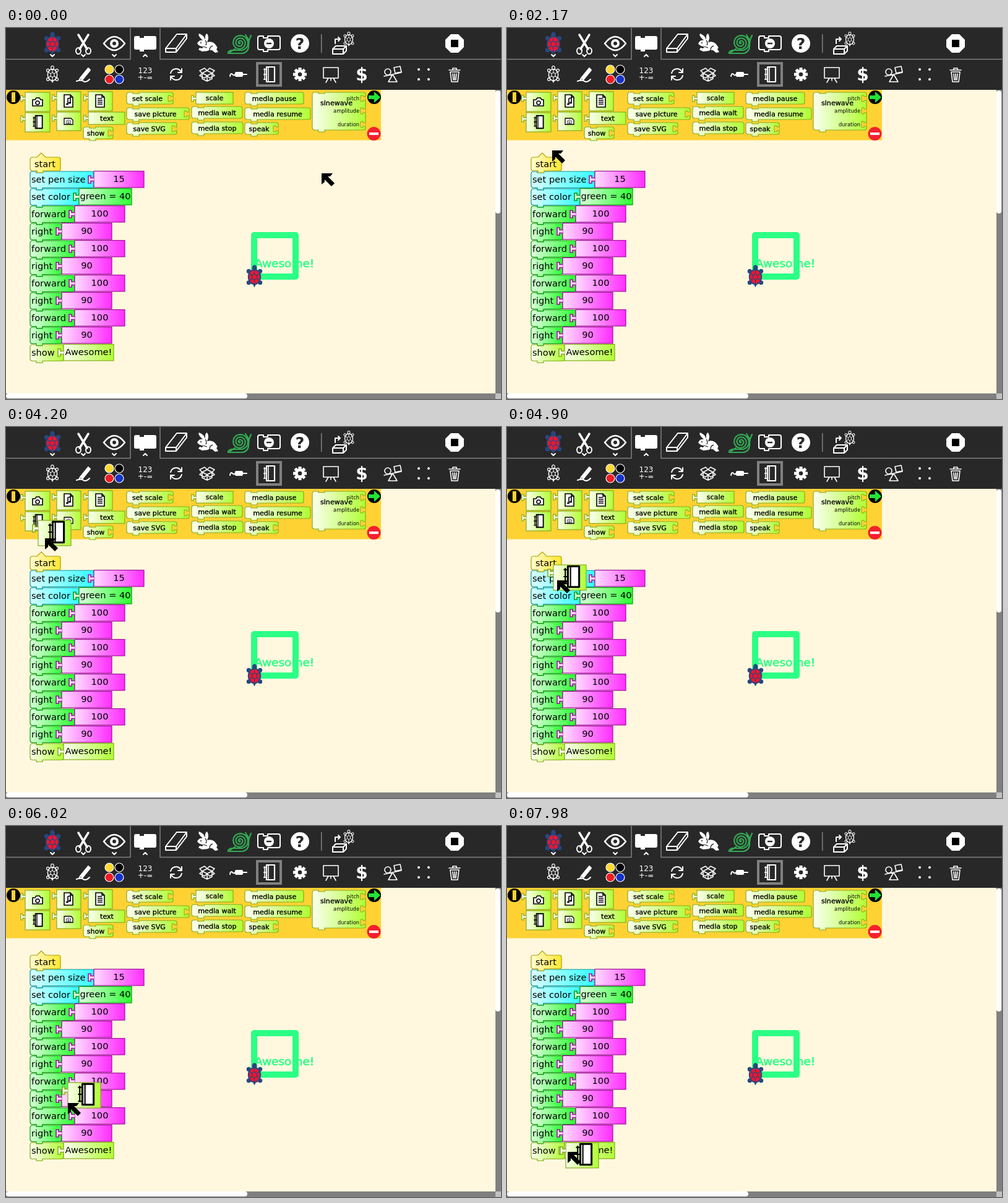
An HTML page that plays this animation: 800x600 px, repeating every 8 s.

```html
<!DOCTYPE html>
<html lang="en">
<head>
<meta charset="utf-8">
<title>Block programming</title>
<style>
  html, body { margin: 0; width: 100%; height: 100%; overflow: hidden; background: #fff8de; }
  svg { display: block; width: 800px; height: 600px; }
  text { font-family: "DejaVu Sans", sans-serif; }
  .line { fill: none; stroke: #fff; stroke-width: 2; stroke-linejoin: round; stroke-linecap: round; }
  .thin { stroke-width: 1.6; }
  .dark { fill: none; stroke: #000; stroke-width: 1.6; stroke-linejoin: round; }
</style>
</head>
<body>
<svg id="stage" viewBox="0 0 800 600"></svg>
<script>
const BAR = '#282828', GREY = '#808080', PEN = '#2bff85', YELLOW = '#ffd234', RED = '#f5142e', BLUE = '#27477e';
// light end, full end, outline
const hues = {
  lime: ['#fbfff0', '#b0ff33', '#86ac18'],
  cyan: ['#d8ffff', '#33ffff', '#0795a0'],
  green: ['#dcffdc', '#2dff33', '#079b0c'],
  magenta: ['#ffdcff', '#ff2dff', '#a0109c'],
  yellow: ['#fffbd0', '#ffe72e', '#b0a000'],
};

const at = (x, y, body, scale = 1) => `<g transform="translate(${x} ${y}) scale(${scale})">${body}</g>`;
const path = (d, attrs = 'class="line"') => `<path d="${d}" ${attrs}/>`;
const box = (x, y, w, h, attrs) => `<rect x="${x}" y="${y}" width="${w}" height="${h}" ${attrs}/>`;
const rect = (x, y, w, h, fill, extra = '') => box(x, y, w, h, `fill="${fill}" ${extra}`);
const oval = (x, y, rx, ry, attrs) => `<ellipse cx="${x}" cy="${y}" rx="${rx}" ry="${ry}" ${attrs}/>`;
const disc = (x, y, r, fill, extra = '') => oval(x, y, r, r, `fill="${fill}" ${extra}`);
const label = (x, y, size, words, extra = '') =>
  `<text x="${x}" y="${y}" font-size="${size}" ${extra}>${words}</text>`;
const paint = hue => `fill="url(#${hue})" stroke="${hues[hue][2]}" stroke-width="1.2"`;
const thin = 'class="line thin"', white = 'fill="#fff"';

const gradients = Object.entries(hues).map(([id, [light, full]]) =>
  `<linearGradient id="${id}"><stop stop-color="${light}"/><stop offset="1" stop-color="${full}"/></linearGradient>`).join('');

function turtle(x, y, shell, edge, scale = 1) {
  const limb = `fill="${shell === 'none' ? 'none' : edge}" stroke="${edge}" stroke-width="1.4"`;
  const feet = [[-8.5, -7.5], [8.5, -7.5], [-8.5, 9.5], [8.5, 9.5]].map(([a, b]) => oval(a, b, 2.6, 2.6, limb)).join('');
  const ring = Array.from({ length: 6 }, (_, i) => [Math.sin(i * Math.PI / 3), -Math.cos(i * Math.PI / 3)]);
  const spokes = ring.map(([c, s]) => `M${4 * c} ${1 + 4.5 * s}L${9 * c} ${1 + 11 * s}`).join('');
  const core = 'M' + ring.map(([c, s]) => `${4 * c} ${1 + 4.5 * s}`).join('L') + 'Z';
  return at(x, y, feet + oval(0, -12.5, 2.8, 3.6, limb) + path('M-1.5 12L0 15L1.5 12Z', limb) +
    oval(0, 1, 9, 11, `fill="${shell}" stroke="${edge}" stroke-width="1.8"`) +
    path(core + spokes, `fill="none" stroke="${edge}" stroke-width="1.2"`), scale);
}

const plug = (x, y, hue, size = 1) =>
  at(x, y, path('M0-2.5H-5V-6H-9V6H-5V2.5H0', `fill="${hues[hue][0]}" stroke="${hues[hue][2]}" stroke-width="1.6"`), size);
const socket = (x, y) => path(`M${x} ${y}h-4v-2h-4v10h4v-2h4`, `fill="${YELLOW}" stroke="#86ac18"`);

function command(x, y, w, h, hue) {
  return path(`M${x} ${y + 4}q0-4 4-4h6v2h10v-2H${x + w - 3}q3 0 3 3V${y + h - 3}q0 3-3 3H${x + 20}v3h-10v-3h-6q-4 0-4-4Z`, paint(hue));
}

function value(x, y, w, h, hue, words) {
  return box(x, y - .5, w, h, paint(hue)) + plug(x, y + 13, hue) +
    label(x + w / 2, y + 16.5, 14.6, words, 'text-anchor="middle"');
}

// Page with a ring binding, drawn around its centre
function notebook(edge, page) {
  return path('M-4-12H9V12H-4Z', `fill="${page}" stroke="${edge}" stroke-width="2.2" stroke-linejoin="round"`) +
    path('M-1-12V12M-9-8h6M-9 0h6M-9 8h6M-7-10V9', `fill="none" stroke="${edge}" stroke-width="1.5"`);
}

function spiral(turns, radius) {
  const steps = turns * 24;
  return 'M' + Array.from({ length: steps + 1 }, (_, i) => {
    const angle = i * Math.PI / 12, r = radius * i / steps;
    return `${(r * Math.cos(angle)).toFixed(1)} ${(r * Math.sin(angle)).toFixed(1)}`;
  }).join('L');
}

function toolbar() {
  const caret = (x, flip) => path(`M${x - 3} ${flip ? 46 : 43}l3 ${flip ? -3 : 3}l3 ${flip ? 3 : -3}`);
  const block = 'M-18-9q0-3 3-3h6v3h7v-3H15q3 0 3 3V7q0 3-3 3H-2v3h-7v-3h-6q-3 0-3-3Z';
  const top = [
    turtle(75, 25, RED, BLUE, 1.12),
    at(125, 25, path('M-8-14L6 9M8-14L-6 9', 'class="line" style="stroke-width:3.5"') +
      oval(-8, 12, 4, 5, 'class="line"') + oval(8, 12, 4, 5, 'class="line"')),
    at(175, 25, path('M-17 0Q0-22 17 0Q0 22-17 0Z', 'class="line" style="stroke-width:2.5"') +
      disc(0, 0, 7, '#fff') + disc(0, 0, 3, BAR)),
    at(225, 25, path(block, white)),
    at(275, 25, path('M-17 8L1-15H17L0 8ZM-17 8V14H0V8M0 14L17-8V-15')),
    at(325, 25, path('M-16 0Q-13-6-7-5Q-16-13-13-16Q-6-14-3-6Q-4-15 0-16Q4-10 0-2Q10-5 15 4Q18 7 15 9L18 14L13 15L8 11Q3 10 1 12L-8 13L-14 10L-12 7L-8 8L-6 5Q-13 5-16 0Z', white) +
      path('M-3-5Q0-2-2 3M4 11Q4 5 9 4M-6 5L0 7', `fill="none" stroke="${BAR}" stroke-width="1.3"`) + disc(-10, -1, 1.1, BAR)),
    at(378, 24, path(spiral(3, 13) + 'M13 0Q13 9 4 12L-14 12Q-20 14-19 17H4Q15 15 14 2L15-5M14-5L9-13M15-5L18-12M-8 10L-16 15',
      'fill="none" stroke="#32a852" stroke-width="2.2" stroke-linecap="round"')),
    at(425, 25, path(block) + disc(0, 0, 8, '#fff') + rect(-4, -1.2, 8, 2.4, BAR)),
    disc(475, 25, 15, '#fff') + label(475, 34, 25, '?', `text-anchor="middle" font-weight="bold" fill="${BAR}"`),
    rect(509, 10, 1.5, 30, GREY),
    turtle(554, 18, 'none', '#fff', .72),
    path('M528 34L533 29H550L545 34ZM528 34V42H545V34M545 42L550 37V29M532 25V18H540M537 15L540 18L537 21'),
    path('M719 10H731L740 19V31L731 40H719L710 31V19Z', white) + rect(719, 19, 12, 12, '#000'),
    caret(75), caret(125), caret(175), caret(225, true),
  ];
  const gear = Array.from({ length: 8 }, (_, i) => rect(-2.5, -11, 5, 6, '#fff', `transform="rotate(${i * 45})"`)).join('');
  const swatch = (x, y, fill) => disc(x, y, 7, fill, 'stroke="#fff" stroke-width="1.2"');
  const bottom = [
    turtle(75, 75, 'none', '#fff', .85),
    at(125, 75, path('M-5 6L8-10L11-7L-2 9L-7 10ZM-11 11Q-4 8 0 11T10 8') + path('M-5 6L8-10L11-7L-2 9Z', white)),
    swatch(167, 67, '#ffd833') + swatch(183, 67, '#000') + swatch(167, 83, '#f01c24') + swatch(183, 83, '#1632c8'),
    label(225, 73, 12, '123', 'fill="#fff" text-anchor="middle"') + label(225, 84, 12, '+-=', 'fill="#fff" text-anchor="middle"'),
    at(275, 75, path('M-9-2Q-7-9 0-9Q5-9 8-4M9-9V-3H3M9 2Q7 9 0 9Q-5 9-8 4M-9 9V3H-3')),
    at(325, 75, path('M-8-2V7L0 11L8 7V-2M0 2V11M-8-2L0-6L8-2L0 2ZM-8-2L-12-6L-4-10L0-6L4-10L12-6L8-2M-8-2L-12 2L-4 6L0 2L4 6L12 2L8-2', thin)),
    at(375, 75, path('M-13 3Q-12-3-9 0T-5 0M8 0H14') + rect(-5, -4, 13, 8, '#fff', 'rx="2"')),
    rect(406, 57, 38, 36, 'none', `stroke="${GREY}" stroke-width="4"`) + at(425, 75, notebook('#fff', 'none')),
    at(475, 75, gear + disc(0, 0, 8, '#fff') + disc(0, 0, 3.3, BAR)),
    at(525, 75, path('M-12-11H12V6H-12ZM-4 6L-8 13M4 6L8 13M0 6V10', thin)),
    label(575, 85, 28, '$', 'fill="#fff" text-anchor="middle" font-weight="bold"'),
    at(625, 75, path('M-14 3L14-3M0 0L-7 12H7ZM2-11L12-13L14-4L4-2Z', thin) + oval(-8, -4, 5, 5, thin)),
    [[667, 67], [683, 67], [667, 83], [683, 83]].map(([x, y]) => disc(x, y, 2, '#fff')).join(''),
    at(725, 75, path('M-9-7H9M-3-7V-10H3V-7M-7-4L-5 12H5L7-4ZM-3-1L-2 9M0-1V9M3-1L2 9', thin)),
  ];
  return rect(0, 0, 800, 100, BAR) + path('M0 50.5H201V0M249 0V50.5H800', `fill="none" stroke="${GREY}" stroke-width="1.5"`) +
    top.join('') + bottom.join('');
}

function palette() {
  const small = (x, y, words) => label(x, y, 11.1, words, 'text-anchor="middle" stroke="#000" stroke-width=".35"');
  const tile = (x, y, w, h) => box(x, y, w, h, paint('lime')) + plug(x, y + 10, 'lime', .8);
  const cmd = (x, y, w, words, hasSocket) => command(x, y, w, 19, 'lime') +
    small(x + w / 2 - (hasSocket ? 4 : 0), y + 14, words) + (hasSocket ? socket(x + w, y + 7) : '');
  const camera = path('M-8-4H-4L-2-7H3L5-4H8V6H-8Z', 'fill="#fff" stroke="#000" stroke-width="1.6"') + oval(0, 1, 3, 3, 'class="dark"');
  const page = body => path('M-7-10H3L7-6V10H-7ZM3-10V-6H7', 'fill="#fff" stroke="#000" stroke-width="1.6"') + body;
  return rect(0, 100, 606, 81.5, YELLOW) +
    tile(31, 104, 40, 31) + tile(82, 103, 39, 31) + tile(133, 103, 39, 31) +
    tile(31, 137, 40, 31) + tile(82, 136, 39, 30) + tile(133, 136, 59, 20) +
    at(51, 120, camera) +
    at(101, 118, page(path('M-1 5V-4L3-5V3', 'class="dark"') + oval(-2, 5, 2, 1.6, '') + oval(2, 3, 2, 1.6, ''))) +
    at(152, 118, page(path('M-4-4H3M-4-1H4M-4 2H4M-4 5H4', 'class="dark"'))) +
    at(51, 152, notebook('#000', '#fff'), .85) +
    at(101, 151, path('M-7-5H4L7-2V5H-7Z', 'fill="#fff" stroke="#000" stroke-width="1.3"') + at(0, 1, camera, .45)) +
    small(163, 150, 'text') + cmd(125, 160, 48, 'show', true) +
    cmd(195, 104, 75, 'set scale', true) + cmd(195, 129, 101, 'save picture', true) + cmd(195, 153, 81, 'save SVG', true) +
    tile(307, 104, 60, 19) + small(337, 117, 'scale') + cmd(300, 127, 82, 'media wait') + cmd(300, 152, 83, 'media stop') +
    cmd(386, 104, 95, 'media pause') + cmd(386, 129, 106, 'media resume') + cmd(386, 153, 54, 'speak', true) +
    command(495, 104, 86, 61, 'lime') + small(534, 125, 'sinewave') +
    [['pitch', 117], ['amplitude', 137], ['duration', 159]].map(([words, y]) =>
      label(571, y, 8.3, words, 'text-anchor="end"') + socket(581, y - 6)).join('') +
    disc(12, 112, 11, '#000') + rect(9, 104, 6, 16, YELLOW) +
    disc(595, 112, 11, '#000') + path('M586 109H595V103L605 112L595 121V115H586Z', 'fill="#21e437"') +
    disc(594.5, 171, 11, '#f4202f') + rect(587, 169, 15, 4, '#fff');
}

function program() {
  const rows = [['set pen size', 103, 'cyan', '15', 81, 'magenta'], ['set color', 79, 'cyan', 'green = 40', 85, 'green']];
  for (let i = 0; i < 4; i++) {
    rows.push(['forward', 72, 'green', '100', 81, 'magenta'], ['right', 51, 'green', '90', 81, 'magenta']);
  }
  rows.push(['show', 54, 'lime', 'Awesome!', 81, 'lime']);
  const start = path('M39 213q0-4 4-4h7l7-7l7 7H85q3 0 3 3V228q0 3-3 3H60v3H50v-3H43q-4 0-4-4Z', paint('yellow')) +
    label(46, 225, 14.6, 'start');
  return rows.map(([words, w, hue, shown, width, valueHue], i) => {
    const y = 232 + i * 28;
    return command(39, y, w, 26.5, hue) + label(41, y + 18, 14.6, words) + value(39 + w, y, width, 26.5, valueHue, shown);
  }).join('') + start;
}

const drawing = rect(401, 335, 67, 67, 'none', `stroke="${PEN}" stroke-width="10" stroke-linejoin="round"`) +
  label(402, 387, 18.5, 'Awesome!', `fill="${PEN}" stroke="${PEN}" stroke-width=".6"`) + turtle(401.5, 401.5, RED, BLUE, 1.08);

const scrollbars = rect(791, 100, 9, 491, GREY) + rect(791, 101, 8, 199, '#fff', 'rx="4"') +
  rect(0, 591, 791, 9, GREY) + rect(0, 591, 390, 8, '#fff', 'rx="4"') + rect(791, 591, 9, 9, '#c0c0c0');

const dragged = box(0, 0, 53, 41, paint('lime')) + plug(0, 13, 'lime') + at(29, 19, notebook('#000', '#fff'), 1.4);
const arrow = path('M0 0H18L14 5H10L21 16L16 21L5 10V14L0 18Z', 'fill="#000"');

const stage = document.getElementById('stage');
stage.innerHTML = `<defs>${gradients}</defs>` + rect(0, 0, 800, 600, '#fff8de') + toolbar() + palette() + program() +
  drawing + scrollbars + `<g id="dragged">${dragged}</g><g id="pointer">${arrow}</g>`;
const block = document.getElementById('dragged'), pointer = document.getElementById('pointer');

const LOOP = 8000, STEP = 70, GRAB = 3500;
// time, x, y
const pointerKeys = [[0, 510, 235], [350, 500, 234], [800, 350, 222], [1400, 130, 203], [1800, 77, 199], [2170, 73, 198],
  [2900, 50, 163], [3500, 48, 160], [4200, 63, 180], [4900, 81, 248], [6020, 100, 448], [6860, 94, 524], [7980, 98, 527]];
const blockKeys = [[3500, 37, 132], [4200, 52, 151], [4900, 75, 223], [6020, 100, 415], [6860, 90, 502], [7980, 95, 512]];

function position(keys, time) {
  const next = Math.max(1, keys.findIndex(key => key[0] >= time));
  const [t0, x0, y0] = keys[next - 1], [t1, x1, y1] = keys[next];
  const part = (time - t0) / (t1 - t0);
  return [x0 + (x1 - x0) * part, y0 + (y1 - y0) * part].map(Math.round);
}

function place(node, keys, time) {
  node.setAttribute('transform', `translate(${position(keys, time)})`);
}

function draw(now) {
  const time = Math.floor(now % LOOP / STEP) * STEP;
  const dragging = time >= GRAB;
  block.setAttribute('visibility', dragging ? 'visible' : 'hidden');
  if (dragging) place(block, blockKeys, time);
  place(pointer, pointerKeys, time);
}

const begin = performance.now();
function tick() {
  draw(performance.now() - begin);
  requestAnimationFrame(tick);
}
tick();
</script>
</body>
</html>
```
